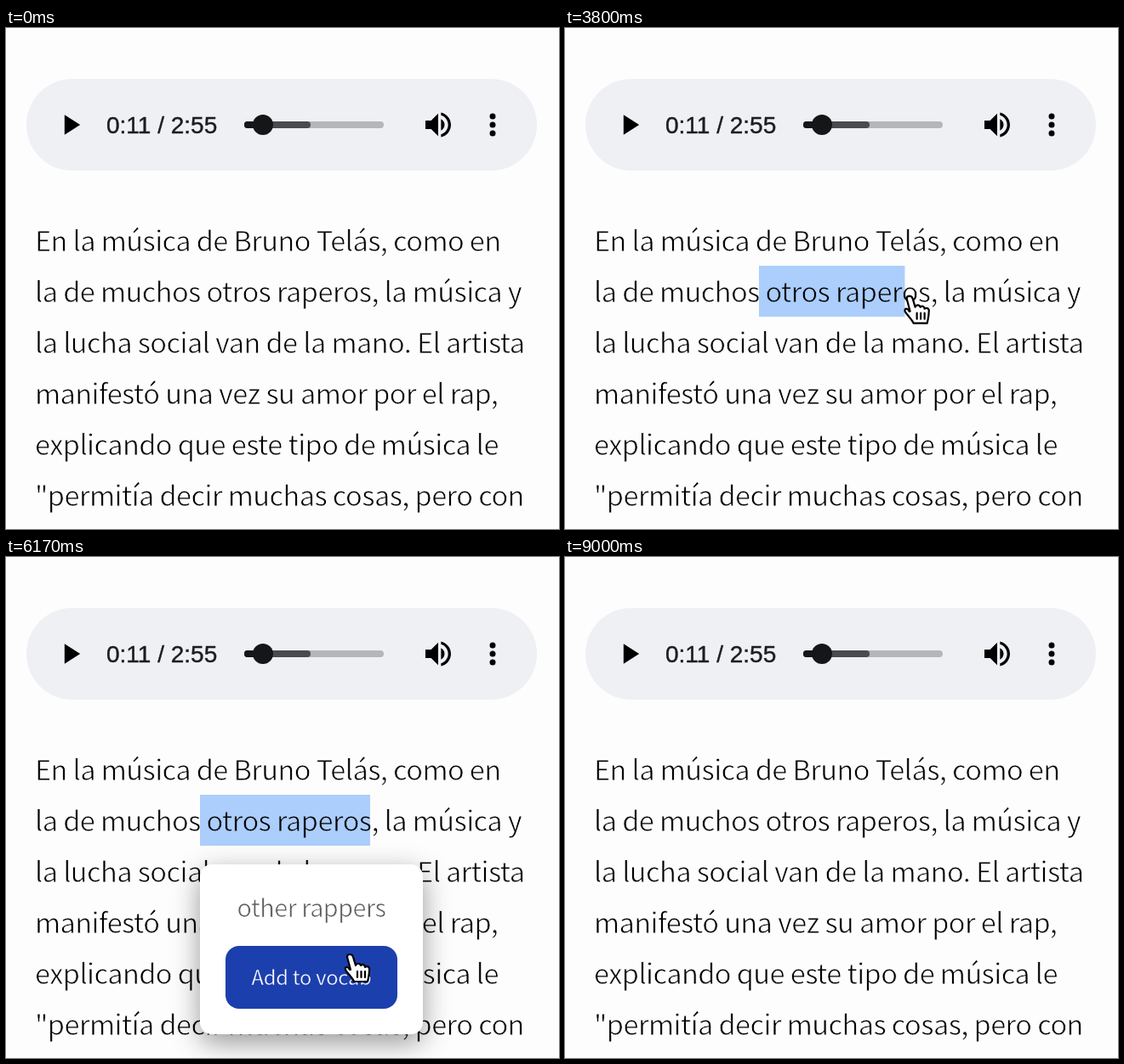
These frames come from a looping animation (650x590 px, 9.16 s). An HTML page:

```html
<!DOCTYPE html>
<html lang="es">
<head>
<meta charset="utf-8">
<title>Highlight to translate</title>
<style>
  html, body { margin: 0; width: 100%; height: 100%; overflow: hidden; background: #fdfdfd; }
  svg { display: block; }
  /* A thin stroke in the ground colour gives the letters a light weight */
  text {
    font-family: "Noto Sans CJK JP", "Noto Sans CJK SC", "Noto Sans CJK", "Noto Sans", sans-serif;
    font-weight: 300; letter-spacing: -.018em; white-space: pre; stroke: #fff; stroke-width: .8;
  }
  #story { font-size: 32.6px; mix-blend-mode: multiply; }
  #time { font: 28px "Liberation Sans", sans-serif; letter-spacing: 0; fill: #1c1d1f; stroke: #1c1d1f; stroke-width: .4; }
  .hover { fill: #1e40af; }
  #card { filter: drop-shadow(0 10px 16px rgba(0, 0, 0, .4)); }
  #message { font-size: 28.8px; fill: #5c5c5c; stroke-width: .7; }
  #label { font-size: 23.7px; letter-spacing: -.01em; fill: #fff; stroke: #1c3fae; stroke-width: .4; }
</style>
</head>
<body>
<svg width="650" height="590" viewBox="0 0 650 590">
  <rect width="650" height="590" fill="#fdfdfd"/>
  <rect x="24" y="60" width="600" height="108" rx="54" fill="#eff0f4"/>
  <path transform="translate(55.5 94) scale(1.667)" d="M8 5v14l11-7z"/>
  <text id="time" x="118" y="124">0:11 / 2:55</text>
  <g fill="none" stroke-width="8" stroke-linecap="round">
    <path d="M284 114H440" stroke="#b5b6b9"/>
    <path d="M284 114H354" stroke="#4a4b4d"/>
    <path d="M284 114H302" stroke="#151618"/>
  </g>
  <circle cx="302" cy="114" r="12" fill="#151618"/>
  <path transform="translate(488 94) scale(1.667)" d="M3 9v6h4l5 5V4L7 9H3zm13.5 3c0-1.77-1.02-3.29-2.5-4.03v8.05c1.48-.73 2.5-2.25 2.5-4.02zM14 3.23v2.06c2.89.86 5 3.54 5 6.71s-2.11 5.85-5 6.71v2.06c4.01-.91 7-4.49 7-8.77s-2.99-7.86-7-8.77z"/>
  <path d="M572 104v0M572 114v0M572 124v0" stroke="#000" stroke-width="7" stroke-linecap="round"/>

  <rect id="selection" x="228" y="280" height="60" fill="#accefc"/>
  <g id="story"></g>

  <g id="popup">
    <rect id="card" x="228" y="362" rx="14" fill="#fff"/>
    <text id="message" y="424" text-anchor="middle"></text>
    <g id="button">
      <rect x="258" y="458" width="202" height="74" rx="16" fill="#1c3fae"/>
      <text id="label" x="359" y="504" text-anchor="middle"></text>
    </g>
  </g>

  <g id="cursor" stroke-linejoin="round" stroke-linecap="round">
    <path id="arrow" d="M0 0V27L6 21.5L10.5 32L15 30L10.7 20H19Z" stroke="#fff" stroke-width="4" paint-order="stroke"/>
    <g id="hand" stroke="#000" stroke-width="2.2">
      <path fill="#fff" d="M-4 3C-4 -1 2 -1 3 3L6 13C7 10 11 10 12 13C14 11 17 12 17 15C20 13 23 15 22 19C22 25 21 27 20 32H4C2 27 -4 22 -6 18C-7 14 -3 14 -1 18L0 18Z"/>
      <path d="M8 20v7M12.500 20v7M17 20v7"/>
    </g>
  </g>
</svg>
<script>
const LOOP = 9160;
const DRAG = 3230, POPUP = 3970, TRANSLATED = 5450, SAVED = 6600, CLOSED = 8150;
const HOVER_LAG = 90;

const lines = [
  'En la música de Bruno Telás, como en',
  'la de muchos otros raperos, la música y',
  'la lucha social van de la mano. El artista',
  'manifestó una vez su amor por el rap,',
  'explicando que este tipo de música le',
  '"permitía decir muchas cosas, pero con'
];

// time, x, y of the pointer tip
const route = [
  [830, 670, 560], [1230, 290, 365], [1470, 290, 365], [1630, 272, 329],
  [2030, 258, 340], [2530, 258, 340], [3030, 226, 313], [3230, 226, 313],
  [3950, 428, 316], [4170, 428, 316], [4800, 511, 267], [5450, 511, 267],
  [6030, 405, 468], [6970, 405, 468], [7700, 565, 375], [7870, 580, 338],
  [8100, 600, 345], [8500, 630, 400], [8770, 630, 400], [9000, 670, 420]
];

const $ = id => document.getElementById(id);
const show = (id, on) => $(id).setAttribute('display', on ? 'inline' : 'none');

$('story').innerHTML = lines.map((line, i) =>
  `<text x="34" y="${263 + 60 * i}">` +
  line.replace(/[^\s,."]+/g, '<tspan>$&</tspan>') + '</text>').join('');
const words = [...document.querySelectorAll('tspan')];

function pointer(t) {
  const next = route.findIndex(key => key[0] > t);
  if (next < 1) return route[next ? route.length - 1 : 0].slice(1);
  const [t0, x0, y0] = route[next - 1], [t1, x1, y1] = route[next];
  const p = (t - t0) / (t1 - t0), e = p * p * (3 - 2 * p);
  return [x0 + (x1 - x0) * e, y0 + (y1 - y0) * e];
}

const popupOpen = t => t >= POPUP && t < CLOSED;
const cardSize = t => t < TRANSLATED ? [382, 100] : [262, 200];

function wordAt(t) {
  if (t >= DRAG && t < POPUP) return;
  const [x, y] = pointer(t), [w, h] = cardSize(t);
  if (popupOpen(t) && x > 228 && x < 228 + w && y > 362 && y < 362 + h) return;
  return words.findLast(word => {
    const base = +word.parentNode.getAttribute('y');
    const box = word.getBoundingClientRect();
    return y > base - 30 && y < base + 5.5 && x > box.left - 14 && x < box.right;
  });
}

function draw(t) {
  const [x, y] = pointer(t);
  const dragging = t >= DRAG && t < POPUP;
  const translated = t >= TRANSLATED;

  const letters = Math.round(Math.max(0, Math.min(200, x - 228)) / 14.286);
  const selected = dragging ? letters * 14.286 : popupOpen(t) ? 200 : 0;
  $('selection').setAttribute('width', selected);

  const hovered = wordAt(t - HOVER_LAG);
  for (const word of words) word.classList.toggle('hover', word === hovered && !dragging);

  const [w, h] = cardSize(t);
  show('popup', popupOpen(t));
  show('button', translated);
  $('card').setAttribute('width', w);
  $('card').setAttribute('height', h);
  $('message').setAttribute('x', 228 + w / 2);
  $('message').textContent = translated ? 'other rappers' : 'highlight text to translate';
  $('label').textContent = t < SAVED ? 'Add to vocab' : 'Vocab saved!';

  const onButton = translated && popupOpen(t) && x > 258 && x < 460 && y > 458 && y < 532;
  const hand = dragging || onButton || !!wordAt(t);
  show('hand', hand);
  show('arrow', !hand);
  $('cursor').setAttribute('transform', `translate(${x} ${y})`);
}

const start = performance.now();
function tick() {
  draw((performance.now() - start) % LOOP);
  requestAnimationFrame(tick);
}
tick();
</script>
</body>
</html>
```
